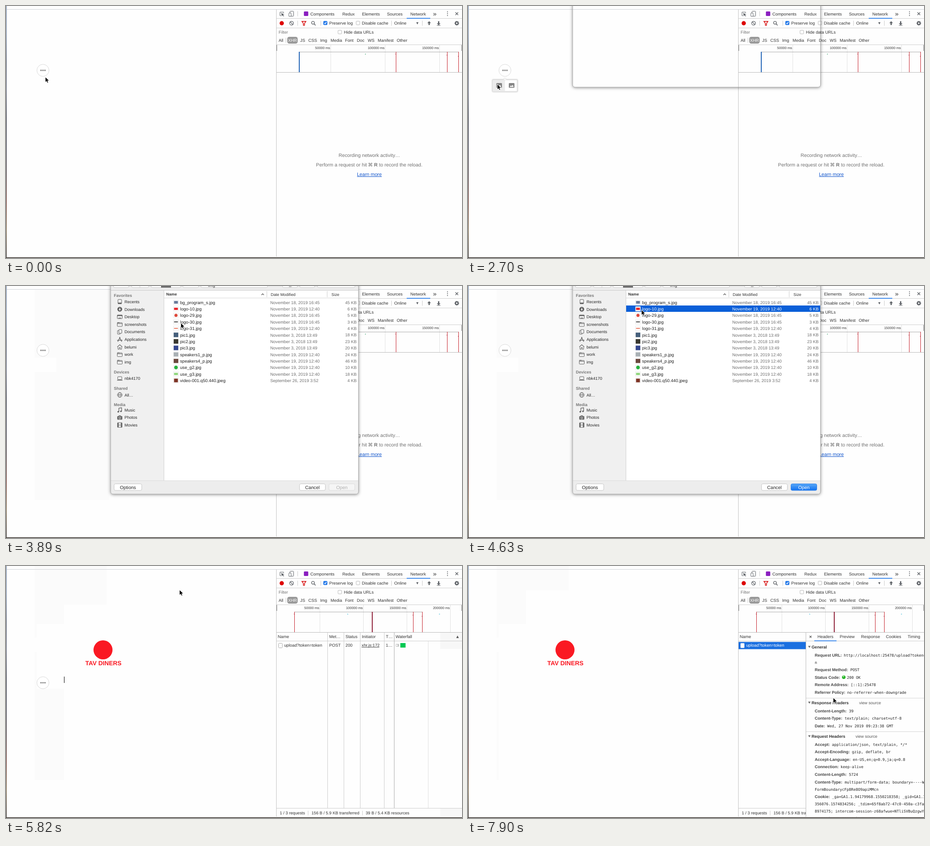
These frames come from a looping animation (1006 px wide and 556 px high, 8000 ms). An HTML page with a canvas:

```html
<!DOCTYPE html>
<html lang="en">
<head>
<meta charset="utf-8">
<title>Upload from editor</title>
<style>
html, body { margin: 0; width: 100%; height: 100%; overflow: hidden; background: #fefefe; }
canvas { display: block; }
</style>
</head>
<body>
<canvas id="stage" width="1006" height="556"></canvas>
<script>
const LOOP = 8000;
const ctx = document.getElementById('stage').getContext('2d');
const SANS = '"Liberation Sans", Arial, sans-serif';
const MONO = '"DejaVu Sans Mono", monospace';
const INK = '#333', GRAY = '#6e6e6e', LINE = '#ccc', BLUE = '#1a73e8', PAGE = '#fefefe', TINT = '#fbfbfb';

// ---- drawing helpers ----
function rect(x, y, w, h, color) { ctx.fillStyle = color; ctx.fillRect(x, y, w, h); }

function box(x, y, w, h, r, fill, stroke, width = 1) {
  ctx.beginPath();
  ctx.roundRect(x, y, w, h, r);
  paint(fill, stroke, width);
}

function disc(x, y, r, fill, stroke, width = 1) {
  ctx.beginPath();
  ctx.arc(x, y, r, 0, 7);
  paint(fill, stroke, width);
}

function poly(points, fill, stroke, width = 1, close = true) {
  ctx.beginPath();
  points.forEach(([x, y]) => ctx.lineTo(x, y));
  if (close) ctx.closePath();
  paint(fill, stroke, width);
}

function paint(fill, stroke, width) {
  if (fill) { ctx.fillStyle = fill; ctx.fill(); }
  if (stroke) { ctx.strokeStyle = stroke; ctx.lineWidth = width; ctx.stroke(); }
}

const line = (x1, y1, x2, y2, color = LINE, width = 1) =>
  poly([[x1, y1], [x2, y2]], null, color, width, false);

// y is the middle of the capital letters
function text(s, x, y, { size = 9.3, color = INK, align = 'left', weight = '', font = SANS } = {}) {
  ctx.font = `${weight} ${size}px ${font}`;
  ctx.textRendering = 'geometricPrecision';
  ctx.textAlign = align;
  ctx.fillStyle = color;
  ctx.fillText(s, x, y + size * 0.36);
}

function at(x, y, draw) {
  ctx.save();
  ctx.translate(x, y);
  draw();
  ctx.restore();
}

// ---- page ----
function desktop() {
  rect(0, 0, 1006, 556, PAGE);
  const g = ctx.createLinearGradient(0, 0, 0, 556);
  ['#8fabcf', '#8ea6c8', '#5b6478', '#6b7186', '#2a2c38', '#303040', '#3d2a2a', '#7a2c18', '#8a6a38', '#2a2018']
    .forEach((c, i) => g.addColorStop(i / 9, c));
  rect(0, 0, 1, 556, g);
  rect(1, 0, 1, 556, '#b9bcc2');
  rect(1, 554, 1005, 1, '#999');
  rect(0, 555, 1006, 1, '#3a3028');
}

function tints(t) {
  if (t < 2850) return;
  if (t < 5370) {
    rect(63, 8, 165, 464, TINT);
  } else {
    const top = t < 6270 ? 85 : 54;
    rect(63, 0, 159, top, TINT);
    rect(63, top, 65, 472 - top, TINT);
    if (t >= 5820) rect(68, 128, 60, t < 7460 ? 143 : 344, PAGE);
  }
  if (t >= 3150) rect(54, 158, 57, 32, PAGE);
}

function moreButton(y) {
  disc(81.5, y, 13.3, '#fff', '#d9d9d9');
  for (const x of [77.3, 81.6, 85.9]) disc(x, y, 1.7, '#858585');
}

function picture(x, y) {
  box(x, y, 12.5, 10.5, 1.5, '#858585');
  poly([[x + 2, y + 8.5], [x + 4.3, y + 5.3], [x + 6, y + 7], [x + 8.3, y + 4], [x + 10.7, y + 8.5]], '#fff');
}

function popup(hover) {
  ctx.save();
  ctx.shadowColor = 'rgba(0,0,0,.18)';
  ctx.shadowBlur = 3;
  box(54, 162.5, 55, 26.5, 1, '#fff', '#d4d4d4');
  ctx.restore();
  poly([[77.5, 162.6], [81.5, 158.5], [85.5, 162.6]], '#fff', '#d4d4d4', 1, false);
  if (hover) rect(54.5, 163, 27, 25.5, '#ececec');
  picture(62.5, 170);
  picture(90, 170);
}

function brand() {
  const red = '#fa1923';
  disc(214, 185, 21, red);
  text('TAV DINERS', 215, 214.3, { size: 13.5, color: red, weight: 'bold', align: 'center' });
}

// ---- developer tools ----
function checkbox(x, y, on) {
  box(x + .5, y + .5, 8, 8, 1.5, on ? '#2b7de9' : '#fff', on ? '#2b7de9' : '#bbb');
  if (on) poly([[x + 2.2, y + 4.6], [x + 3.9, y + 6.4], [x + 6.9, y + 2.5]], null, '#fff', 1.3, false);
}

function toolIcons() {
  const c = '#5f6368';
  poly([[607, 21.5], [604.5, 21.5], [604.5, 13.5], [612.5, 13.5], [612.5, 15.5]], null, c, 1, false);
  poly([[607, 15.5], [614, 18.5], [611, 19.3], [613.5, 22], [612.3, 23], [610, 20.3], [608.6, 22.8]], c);
  box(626.5, 11.5, 8, 11, 1, null, c);
  box(624, 15.5, 5, 7.5, 1, PAGE, c);
  box(657.2, 12, 9.6, 10, 1.5, '#8a1fc0');
  for (const y of [13, 17, 21]) disc(974, y, 1.1, c);
  for (const d of [-1, 1]) line(994.5 - 3 * d, 14, 994.5 + 3 * d, 20, c, 1.4);
  disc(608.3, 38, 4.7, '#dd0000');
  disc(630, 38, 4.2, null, c, 1.3);
  line(627, 35, 633, 41, c, 1.3);
  poly([[652.8, 34], [661.7, 34], [658.6, 38.3], [658.6, 42.5], [656, 42.5], [656, 38.3]], null, '#d50000', 1.4);
  disc(677.3, 37, 3.1, null, c, 1.3);
  line(679.6, 39.4, 683, 42.8, c, 1.6);
  text('▼', 907.5, 38, { size: 6.5, align: 'center', color: c, font: '"DejaVu Sans", sans-serif' });
  [[933.5, -1], [954.5, 1]].forEach(([x, d]) => {
    poly([[x - 4, 38 + d * .3], [x + 4, 38 + d * .3], [x, 38 + d * 4.4]], c);
    rect(x - 1.4, d < 0 ? 37 : 33.6, 2.8, 5, c);
    if (d > 0) rect(x - 4, 42.4, 8, 1, c);
  });
  for (let i = 0; i < 4; i++) {
    const a = i * Math.PI / 4, dx = 5 * Math.cos(a), dy = 5 * Math.sin(a);
    line(994.5 - dx, 38 - dy, 994.5 + dx, 38 + dy, c, 2);
  }
  disc(994.5, 38, 3.9, c);
  disc(994.5, 38, 1.7, PAGE);
}

function timeline(step, first, blue, reds, dots, dark) {
  for (let i = 0; first + i * step < 1006; i++) {
    const x = Math.floor(first + i * step) + .5;
    line(x, 86, x, 146, '#e2e2e2');
    text(`${50000 * (i + 1)} ms`, x - 1.5, 92.7, { size: 7.5, align: 'right' });
  }
  line(blue || reds[0], 101.5, reds.at(-1), 101.5, '#aaa');
  reds.forEach((x, i) => {
    rect(x - .5, 101, 1, 45, '#c5202a');
    rect(x - 1, 105 + i * 2.5, 1.5, 2, '#b02030');
  });
  if (blue) rect(blue - 1, 101, 2, 45, '#2163b5');
  if (dark) rect(dark - 1, 101, 2, 45, '#8f2038');
  dots.forEach(x => rect(x - 1, 105.5, 1.7, 1.4, blue ? '#37a06a' : '#2fb4d4'));
  for (const x of [597, 1005]) rect(x, 86, 1, 13, '#777');
}

function emptyLog() {
  const s = { size: 10.7, color: '#707070' };
  text('Recording network activity…', 801.5, 329.5, { ...s, align: 'center' });
  text('Perform a request or hit', 684, 350.5, s);
  text('⌘', 798.5, 350.5, { ...s, font: '"DejaVu Sans", sans-serif' });
  text('R', 812, 350.5, { ...s, weight: 'bold' });
  text('to record the reload.', 823, 350.5, s);
  text('Learn more', 801.5, 371.5, { ...s, color: '#1155cc', align: 'center' });
  line(774.5, 376.5, 829, 376.5, '#1155cc');
}

function fileIcon() { box(601.5, 170.5, 8, 10, 1, '#fff', '#aaa'); }

function requestTable(hover) {
  rect(958, 147, 48, 36, '#f7f7f7');
  rect(958, 535, 48, 17, '#f7f7f7');
  if (hover) rect(597, 167, 409, 16, '#eef3fb');
  line(597, 165.5, 1006, 165.5);
  for (const x of [709.5, 745.5, 781.5, 834.5]) line(x, 147, x, 534);
  line(856.5, 147, 856.5, 534, '#aaa');
  line(931.5, 166, 931.5, 534, '#e0e0e0');
  [['Name', 599.5], ['Met…', 713], ['Status', 749], ['Initiator', 785], ['T…', 838], ['Waterfall', 859.5]]
    .forEach(([s, x]) => text(s, x, 156));
  poly([[993.3, 159], [999, 159], [996.1, 153.5]], '#555');
  fileIcon();
  [['upload?token=token', 613.7], ['POST', 713], ['200', 749], ['xhr.js:172', 784.5], ['1…', 838]]
    .forEach(([s, x]) => text(s, x, 175));
  line(784.5, 179.5, 823.5, 179.5, INK, .8);
  box(860.5, 172.5, 4, 5, 0, '#fff', '#bbb');
  line(865.5, 172, 865.5, 178, '#999');
  rect(870, 170, 11.5, 10, '#00c853');
  line(597, 534.5, 1006, 534.5);
  statusBar();
}

function statusBar() {
  text('1 / 3 requests', 604, 544.7, { size: 9.2 });
  line(666.5, 540, 666.5, 550);
  text('156 B / 5.9 KB transferred', 674, 544.7, { size: 9.15 });
  line(786.5, 540, 786.5, 550);
  text('39 B / 5.4 KB resources', 793.5, 544.7, { size: 9.15 });
}

function section(title, y, sourceX) {
  poly([[750.3, y - 2], [756, y - 2], [753.1, y + 2.4]], '#6e6e6e');
  text(title, 758, y, { size: 9.1, weight: 'bold' });
  if (sourceX) text('view source', sourceX, y, { size: 9.1, color: '#555' });
}

const FIELDS = [
  [196.5, 'Request URL:', 829, 'http://localhost:25478/upload?token=toke'],
  [212.5, '', 765, 'n'],
  [229, 'Request Method:', 843.5, 'POST'],
  [245.5, 'Status Code:', 836, '200 OK'],
  [262, 'Remote Address:', 844.5, '[::1]:25478'],
  [279, 'Referrer Policy:', 836.5, 'no-referrer-when-downgrade'],
  [319.5, 'Content-Length:', 840.5, '39'],
  [336, 'Content-Type:', 831, 'text/plain; charset=utf-8'],
  [352.5, 'Date:', 792.5, 'Wed, 27 Nov 2019 09:23:38 GMT'],
  [393.5, 'Accept:', 803, 'application/json, text/plain, */*'],
  [410, 'Accept-Encoding:', 847, 'gzip, deflate, br'],
  [426.5, 'Accept-Language:', 849, 'en-US,en;q=0.9,ja;q=0.8'],
  [443, 'Connection:', 822, 'keep-alive'],
  [460, 'Content-Length:', 840.5, '5724'],
  [476.5, 'Content-Type:', 831, 'multipart/form-data; boundary=----Web'],
  [492.5, '', 765, 'FormBoundarycFp8Re8O9apiMMcn'],
  [509, 'Cookie:', 803, '_ga=GA1.1.94179968.1550218358; _gid=GA1.1'],
  [525, '', 765, '356076.1574834256; _tdim=65f8ab72-47c0-450a-c3fa'],
  [541, '', 765, '8974175; intercom-session-z68afwue=NTliSVBuQzgwY'],
  [557, '', 765, 'QXVLLkltQThpS0JOSWlkd3VxT2hLbHZpTmRsY2FhbWtx']
];

function requestDetails() {
  text('Name', 599.5, 156);
  line(597, 165.5, 1006, 165.5);
  rect(597, 167.5, 148, 16, '#1a6fe0');
  box(601.5, 170.5, 8, 10, 1, '#fff', '#cfdcf5');
  text('upload?token=token', 613.7, 175, { color: '#fff' });
  line(597, 534.5, 745, 534.5);
  ctx.save();
  ctx.beginPath();
  ctx.rect(597, 534, 148, 19);
  ctx.clip();
  statusBar();
  ctx.restore();

  ctx.save();
  ctx.beginPath();
  ctx.rect(745, 147, 261, 406.5);
  ctx.clip();
  line(745.5, 147, 745.5, 554, '#bbb');
  for (const d of [-1, 1]) line(755.7 - 2.2 * d, 154, 755.7 + 2.2 * d, 158.4, '#555', 1.1);
  [['Headers', 771], ['Preview', 820], ['Response', 867], ['Cookies', 922], ['Timing', 970]]
    .forEach(([s, x]) => text(s, x, 156));
  rect(764, 164.4, 49, 1.6, BLUE);
  section('General', 178.3);
  section('Response Headers', 301.3, 863);
  section('Request Headers', 375.6, 855);
  line(746, 291.5, 1006, 291.5, '#d5d5d5');
  line(746, 365.5, 1006, 365.5, '#d5d5d5');
  FIELDS.forEach(([y, name, x, value]) => {
    text(name, 765, y, { size: 9.05, weight: 'bold', color: '#444' });
    text(value, x, y, { size: 8.36, font: MONO, color: '#222' });
  });
  disc(829, 245.3, 3.9, '#25b325');
  disc(828.4, 243.7, 1.8, '#8be08b');
  ctx.restore();
}

function tooltip() {
  ctx.save();
  ctx.shadowColor = 'rgba(0,0,0,.3)';
  ctx.shadowBlur = 4;
  ctx.shadowOffsetY = 1;
  box(611.5, 190.5, 189, 18, 1.5, '#f3f3f3', '#bbb');
  ctx.restore();
  text('http://localhost:25478/upload?token=token', 618, 199.5, { size: 9.35 });
}

function devtools(t) {
  line(596.5, 8, 596.5, 553, '#c4c4c4');
  for (const y of [27.5, 48.5, 85.5, 146.5]) line(597, y, 1006, y, y > 140 ? '#bbb' : '#d0d0d0');
  [['Components', 671.5], ['Redux', 742], ['Elements', 785.5], ['Sources', 840.5], ['Network', 892]]
    .forEach(([s, x]) => text(s, x, 17.3, { size: 9.4 }));
  text('»', 942, 16.6, { size: 14 });
  rect(884, 26.4, 52, 1.6, BLUE);
  [[643.5, 17], [643.5, 38], [694.5, 38], [850.5, 38], [918.5, 38]]
    .forEach(([x, y]) => line(x, y - 5.5, x, y + 5.5));
  toolIcons();
  checkbox(700, 33, true);
  checkbox(772, 33);
  checkbox(732, 53);
  text('Preserve log', 713, 38);
  text('Disable cache', 785, 38);
  text('Online', 856.5, 38);
  text('Filter', 601.5, 58, { color: '#757575' });
  text('Hide data URLs', 745.5, 57.5);
  line(617.5, 70, 617.5, 81);
  box(620.5, 68, 23, 15, 4.5, '#999');
  [['All', 601.5], ['JS', 649], ['CSS', 667], ['Img', 693], ['Media', 716], ['Font', 748], ['Doc', 774],
    ['WS', 798], ['Manifest', 820], ['Other', 862]].forEach(([s, x]) => text(s, x, 75.6));
  text('XHR', 632, 75.6, { color: '#fff', align: 'center' });

  if (t < 5370) {
    timeline(120.2, 716, 647, [860.5, 973.5, 998.5], [793]);
    emptyLog();
    return;
  }
  timeline(96, 692, 0, [636.5, 898.5, 918.5], [754, 956.5], 808);
  if (t < 7460) requestTable(t >= 6870);
  else requestDetails();
  if (t >= 7310 && t < 7460) tooltip();
}

// ---- file dialog ----
const SIDE = [
  ['Favorites', 20.3], ['Recents', 34.7, 'doc'], ['Downloads', 51.3, 'down'], ['Desktop', 68, 'window'],
  ['screenshots', 84.6, 'folder'], ['Documents', 101.2, 'docs'], ['Applications', 117.9, 'apps'],
  ['belumi', 134.5, 'home'], ['work', 151.2, 'folder'], ['img', 167.8, 'folder'],
  ['Devices', 189.7], ['nbk4170', 204, 'laptop'], ['Shared', 226], ['All…', 240.3, 'globe'],
  ['Media', 261.7], ['Music', 273.5, 'note'], ['Photos', 290.2, 'camera'], ['Movies', 306.8, 'film']
];

const ICONS = {
  doc(c) { box(-4, -5, 8, 9, 1, null, c); rect(-4, 2, 8, 3, c); },
  down(c) { disc(0, 0, 5.3, c); line(0, -3, 0, 1, '#f0f0f0', 1.5); poly([[-2.8, 0], [2.8, 0], [0, 3.2]], '#f0f0f0'); },
  window(c) { box(-5.5, -4, 11, 8, 1, null, c); rect(-5.5, -4, 11, 2.3, c); rect(-3, 2, 6, 1.2, c); },
  folder(c) { box(-5.5, -3.5, 11, 8, 1, null, c); rect(-5.5, -4.5, 5, 1.5, c); line(-5, -1.5, 5, -1.5, c); },
  docs(c) { box(-5, -3, 6, 8, .5, null, c); box(-2, -5, 6.5, 8, .5, '#f0f0f0', c); },
  apps(c) { line(-4.5, 5, .8, -5, c, 1.3); line(4.5, 5, -.8, -5, c, 1.3); line(-6, 1.7, 6, 1.7, c, 1.3); },
  home(c) { poly([[-5.5, 0], [0, -5], [5.5, 0]], null, c, 1.2, false); poly([[-4, 0], [-4, 5], [-1, 5], [-1, 1], [1, 1], [1, 5], [4, 5], [4, 0]], null, c, 1, false); },
  laptop(c) { box(-4.5, -4, 9, 6.5, .8, null, c); rect(-6, 3.2, 12, 1.3, c); },
  globe(c) { disc(0, 0, 5.2, null, c); line(-5, 0, 5, 0, c); ctx.beginPath(); ctx.ellipse(0, 0, 2.4, 5.2, 0, 0, 7); paint(null, c, 1); },
  note(c) { poly([[-2, 4], [-2, -4], [4, -5], [4, 3]], null, c, 1.3, false); disc(-3.4, 4, 1.8, c); disc(2.6, 3, 1.8, c); },
  camera(c) { box(-5.5, -3, 11, 7.5, 1, c); rect(-2.5, -4.5, 5, 2, c); disc(0, .7, 2.2, null, '#f0f0f0'); },
  film(c) { box(-5, -5, 10, 10, .5, null, c); rect(-5, -5, 2.5, 10, c); rect(2.5, -5, 2.5, 10, c); line(-3, 0, 3, 0, c); }
};

const NOV18 = 'November 18, 2019 16:45', NOV19 = 'November 19, 2019 12:40', NOV3 = 'November 3, 2018 13:49';
const FILES = [
  ['bg_program_s.jpg', NOV18, 45, '#6b7c9c', 6], ['logo-10.jpg', NOV19, 6, '#e8262c', 5],
  ['logo-29.jpg', NOV18, 5, '#dd4a3c', 7], ['logo-30.jpg', NOV18, 3, '#777', 3],
  ['logo-31.jpg', NOV19, 4, '#e8755c', 2], ['pic1.jpg', NOV3, 18, '#46607c', 10],
  ['pic2.jpg', NOV3, 23, '#39382f', 10], ['pic3.jpg', NOV3, 20, '#34478f', 10],
  ['speakers1_p.jpg', NOV19, 24, '#a9b1b5', 9], ['speakers4_p.jpg', NOV19, 46, '#6b473d', 9],
  ['use_g2.jpg', NOV19, 10, '#27b13d', 8], ['use_g3.jpg', NOV19, 18, '#8fd67c', 5],
  ['video-001.q50.440.jpeg', 'September 26, 2019 3:52', 4, '#7d3324', 8]
];

function thumb(y, color, h, i) {
  box(369.5, y - 5.2, 11, 10.4, 0, '#fff', '#ddd', .6);
  const w = h > 8 ? 10 : h > 6 && i < 12 ? 7 : 8.5;
  if (i === 2 || i === 10) disc(375, y, h / 2, color);
  else rect(375 - w / 2, y - h / 2, w, h, color);
}

function button(x, label, color = '#222', fill = '#fff', edge = '#c6c6c6') {
  const w = label === 'Options' ? 62 : 58;
  box(x + .5, 436.5, w - 1, 14.5, 3, fill, edge);
  text(label, x + w / 2, 443.9, { size: 10.3, color, align: 'center' });
}

function dialogBody(selected, canOpen) {
  rect(231, -200, 546, 700, '#ededed');
  rect(231, 10, 117, 419, '#f0f0f0');
  rect(349, 10, 428, 419, '#fff');
  rect(348, 10, 1, 419, '#d0d0d0');
  rect(231, 9, 546, 1, '#c9c9c9');
  [[237, 34], [277, 38], [320, 66], [390, 35], [430, 147], [610, 33], [648, 33], [687, 83]]
    .forEach(([x, w]) => box(x, -12, w, 15.5, 3, '#fff', '#c8c8c8'));
  rect(342, -12, 22, 15.5, '#6b6b6b');
  line(295.5, -12, 295.5, 3, '#ccc');
  line(624, 1.5, 630, 1.5, '#777');
  text('img', 446, -1, { size: 9.5 });

  SIDE.forEach(([label, y, icon]) => {
    text(label, icon ? 261.5 : 238, y, { size: 9, color: icon ? '#262626' : '#777', weight: icon ? '' : 'bold' });
    if (icon) at(251, y, () => ICONS[icon]('#606060'));
  });

  rect(349, 26, 428, 1, '#d8d8d8');
  for (const x of [575.5, 708.5]) line(x, 11, x, 25);
  text('Name', 353.5, 18.3, { size: 8.6, weight: 'bold' });
  text('Date Modified', 584, 18.3, { size: 8.9 });
  text('Size', 718, 18.3, { size: 8.9 });
  poly([[563.5, 19.8], [566.3, 17], [569, 19.8]], null, '#444', 1.2, false);

  FILES.forEach(([name, date, kb, color, h], i) => {
    const y = 36 + i * 14.37, on = selected && i === 1;
    if (on) rect(349, 43, 428, 14, '#0a5fd8');
    thumb(y, color, h, i);
    const dim = on ? '#fff' : GRAY;
    text(name, 384, y + .3, { size: 9.6, color: on ? '#fff' : '#222' });
    text(date, 583, y + .3, { size: 9.43, color: dim });
    text(`${kb} KB`, 773.5, y + .3, { size: 9.3, color: dim, align: 'right' });
  });

  rect(231, 429, 546, 1, '#dcdcdc');
  button(238, 'Options');
  button(647, 'Cancel');
  if (canOpen) {
    const g = ctx.createLinearGradient(0, 436, 0, 451);
    g.addColorStop(0, '#5aa9f8');
    g.addColorStop(1, '#1272f0');
    button(712, 'Open', '#fff', g, '#2f80e8');
  } else {
    button(712, 'Open', '#b0b0b0', '#f5f5f5', '#dcdcdc');
  }
}

function dialog(bottom, filled, selected, canOpen) {
  const shape = () => ctx.roundRect(231, -300, 546.5, bottom + 300, 5);
  ctx.save();
  ctx.beginPath();
  ctx.rect(0, 0, 1006, 556);
  shape();
  ctx.clip('evenodd');
  ctx.shadowColor = 'rgba(0,0,0,.5)';
  ctx.shadowBlur = 7;
  ctx.shadowOffsetY = 1;
  ctx.beginPath();
  shape();
  paint('#999');
  ctx.restore();

  ctx.save();
  ctx.beginPath();
  shape();
  ctx.clip();
  ctx.translate(0, bottom - 459);
  if (filled) dialogBody(selected, canOpen);
  ctx.restore();
  ctx.beginPath();
  shape();
  paint(null, '#b0b0b0', 1);
}

// ---- pointer ----
const PATH = [
  [0, 87, 157], [150, 79, 141], [600, 75, 152], [750, 69, 165], [900, 64, 171.5], [1200, 65, 173],
  [2850, 290, 150], [3000, 397, 136], [3450, 395, 125], [3600, 390, 105], [3750, 386, 82], [3900, 383, 62],
  [4030, 383, 53], [6270, 402, 62], [6420, 470, 100], [6570, 560, 150], [6720, 615, 178], [6870, 630, 182],
  [7010, 632, 182], [7610, 700, 225], [7750, 780, 275], [7900, 806, 291]
];

function pointer(t) {
  const [, x, y] = PATH.findLast(p => p[0] <= t);
  const hand = t >= 6870 && t < 7610;
  ctx.lineJoin = 'round';
  at(x, y, () => {
    if (hand) {
      poly([[-1.5, 0], [.3, 0], [.8, 4], [4.5, 4.6], [5.5, 6], [5.2, 9], [4, 12], [-1, 12], [-4, 7.5], [-3.3, 6.3], [-1.4, 7.5]],
        '#fff', '#111', 1.1);
      for (const dx of [.3, 2, 3.6]) line(dx, 8, dx, 10.3, '#333', .6);
    } else {
      poly([[0, 0], [0, 11], [2.5, 8.7], [4.3, 12.8], [6.2, 12], [4.5, 8], [8, 7.9]], '#000', '#fff', 1.4);
      poly([[.2, .6], [.2, 10.5], [2.6, 8.2], [4.5, 12.3], [5.8, 11.7], [4, 7.6], [7.4, 7.5]], '#000');
    }
  });
  ctx.lineJoin = 'miter';
}

// ---- scene ----
function draw(t) {
  desktop();
  tints(t);
  line(2, 7.5, 1006, 7.5, '#d0d3d8');
  if (t < 7460) moreButton(t < 5820 ? 142 : 257.6);
  if (t >= 300 && t < 3150) popup(t >= 750 && t < 2850);
  if (t >= 5520) brand();
  if (t >= 5820 && t < 6270) rect(128, 244, 1, 14, '#000');
  devtools(t);
  if (t >= 2700 && t < 2850) dialog(179, false);
  else if (t >= 2850 && t < 4780) dialog(459, true, t >= 4480, t >= 4630);
  else if (t >= 4780 && t < 5080) dialog(t < 4930 ? 400 : 140, true, true, true);
  pointer(t);
}

function frame(now) {
  draw(now % LOOP);
  requestAnimationFrame(frame);
}
requestAnimationFrame(frame);
</script>
</body>
</html>
```
